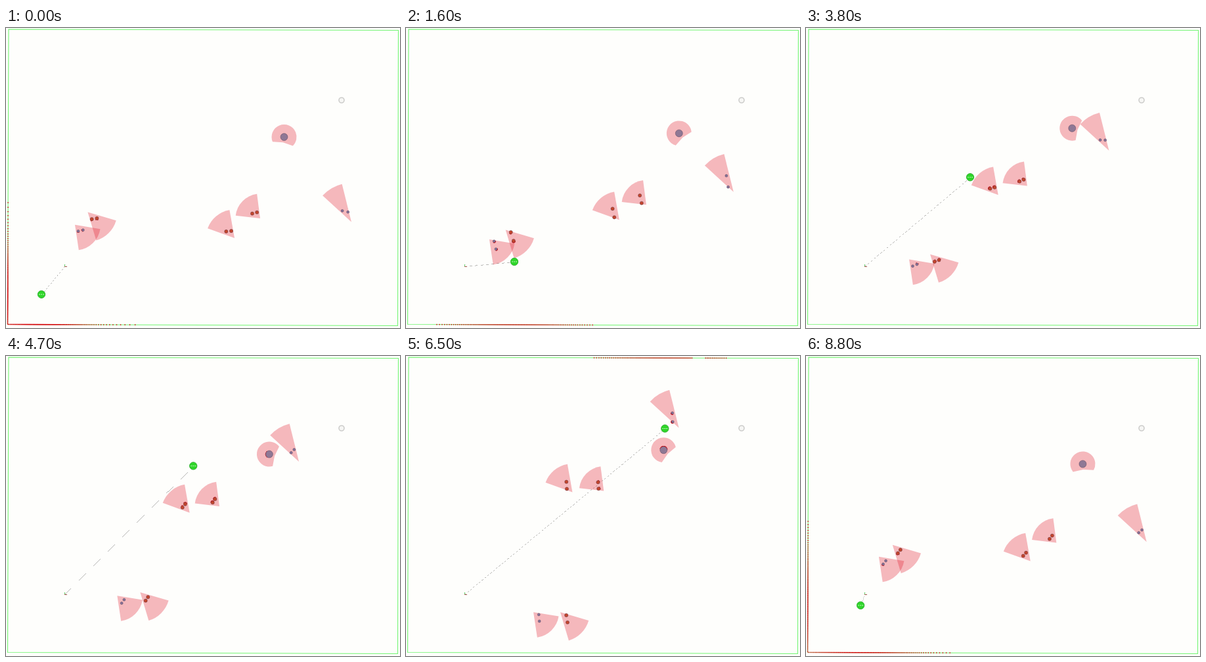
An HTML page with a canvas for the animation above (8900 ms loop, 600x457 px).

```html
<!DOCTYPE html>
<html lang="en">
<head>
<meta charset="utf-8">
<title>Robot among walkers</title>
<style>
html, body { margin: 0; width: 100%; height: 100%; overflow: hidden; background: #fefefc; }
canvas { display: block; width: 600px; height: 457px; }
</style>
</head>
<body>
<canvas id="stage" width="600" height="457"></canvas>
<script>
const ctx = document.getElementById('stage').getContext('2d');
const LOOP = 8900, RESTART = 8100, LEAD = 270;
const RAD = Math.PI / 180, TAU = Math.PI * 2;
const RANGE = 155, RAYS = 360;
const BLUE = '#86739a', RED = '#c4452c';

const walls = [[4, 2], [597.5, 3.5], [596.5, 453.5], [2.5, 451.5]];
const marker = { x: 89, y: 363 }, goal = { x: 511, y: 110 };

// robot waypoints: seconds, x, y
const route = [
  [0, 54, 405.8], [0.45, 84.5, 379.2], [1.6, 165, 356], [2.7, 212, 299],
  [3.8, 250, 227.3], [5.5, 322.3, 122.5], [6.5, 394.3, 110.5], [7.8, 491.3, 117.6]
];

// start, velocity per second, sector radius and spread in degrees
const walkers = [
  { x: 105, y: 299.8, vx: 13.7, vy: 13.9, r: 39, spread: 72, leg: 2, color: BLUE },
  { x: 124.5, y: 280.5, vx: 17, vy: 16.9, r: 45, spread: 57, leg: 2.6, color: RED },
  { x: 348, y: 320, vx: -14.55, vy: -17.3, r: 43.5, spread: 60, leg: 2.6, color: RED },
  { x: 387, y: 290, vx: -13.2, vy: -13, r: 37.5, spread: 76, leg: 2.6, color: RED },
  { x: 526, y: 295.5, vx: -17, vy: -28.6, r: 59.5, spread: 33.5, leg: 2, color: BLUE }
];

// cubic through the waypoints, straight beyond both ends
function along(axis, t) {
  const last = route.length - 1;
  const slope = (a, b) => (route[b][axis] - route[a][axis]) / (route[b][0] - route[a][0]);
  if (t <= 0) return route[0][axis] + slope(0, 1) * t;
  if (t >= route[last][0]) return route[last][axis] + slope(last - 1, last) * (t - route[last][0]);
  const i = route.findIndex(p => p[0] > t) - 1;
  const h = route[i + 1][0] - route[i][0], u = (t - route[i][0]) / h;
  const u2 = u * u, u3 = u2 * u, ease = 3 * u2 - 2 * u3;
  const tangent = k => slope(Math.max(k - 1, 0), Math.min(k + 1, last));
  return route[i][axis] * (1 - ease) + route[i + 1][axis] * ease
    + h * (tangent(i) * (u3 - 2 * u2 + u) + tangent(i + 1) * (u3 - u2));
}

function disc(x, y, r, fill, edge, width = 0.7) {
  ctx.beginPath();
  ctx.arc(x, y, r, 0, TAU);
  ctx.fillStyle = fill;
  ctx.fill();
  ctx.strokeStyle = edge;
  ctx.lineWidth = width;
  ctx.stroke();
}

function sector(apexX, apexY, x, y, r, from, to) {
  ctx.beginPath();
  ctx.moveTo(apexX, apexY);
  ctx.arc(x, y, r, from, to);
  ctx.closePath();
  ctx.fillStyle = 'rgba(220,20,40,0.3)';
  ctx.fill();
}

// draws the zone ahead of a walker and returns the two legs
function drawWalker(w, t) {
  const x = w.x + w.vx * t, y = w.y + w.vy * t;
  const head = Math.atan2(w.vy, w.vx), half = w.spread / 2 * RAD;
  sector(x, y, x, y, w.r, head - half, head + half);

  const c = Math.cos(head), s = Math.sin(head), reach = 0.315 * w.r;
  const swing = 0.135 * w.r * Math.cos((377 * t - 68) * RAD);
  const side = 3.2 * Math.sign(w.vx);
  return [-1, 1].map(k => {
    const ahead = reach + k * swing * Math.sign(w.vx);
    return {
      x: x + c * ahead + s * k * side, y: y + s * ahead - c * k * side,
      r: w.leg, color: w.color
    };
  });
}

// slow walker with a wide zone, open behind
function drawWideWalker(t) {
  const x = 423.5 - 4.8 * t, y = 166 - 3.5 * t;
  const back = (17 + 4.8 * (t - 4.2) ** 2) * RAD, half = 56 * RAD;
  sector(x + 8.5 * Math.cos(back), y + 8.5 * Math.sin(back), x, y, 19, back + half, back + TAU - half);
  return { x, y, r: 5.5, color: '#8f7895' };
}

function drawWalls() {
  ctx.beginPath();
  walls.forEach(p => ctx.lineTo(p[0], p[1]));
  ctx.closePath();
  ctx.strokeStyle = '#72f572';
  ctx.lineWidth = 1.1;
  ctx.stroke();
}

function wallHit(ox, oy, dx, dy) {
  const hits = walls.map((a, i) => {
    const b = walls[(i + 1) % 4], ex = b[0] - a[0], ey = b[1] - a[1];
    const d = ((a[0] - ox) * ey - (a[1] - oy) * ex) / (dx * ey - dy * ex);
    return d > 0 ? d : Infinity;
  });
  return Math.min(...hits);
}

function legHit(ox, oy, dx, dy, leg) {
  const px = leg.x - ox, py = leg.y - oy;
  const ahead = px * dx + py * dy, off = px * dy - py * dx;
  if (ahead < 0 || Math.abs(off) > leg.r) return Infinity;
  return ahead - Math.sqrt(leg.r * leg.r - off * off);
}

function drawScan(ox, oy, legs) {
  ctx.fillStyle = '#d80c14';
  for (let i = 0; i < RAYS; i++) {
    const a = i / RAYS * TAU, dx = Math.cos(a), dy = Math.sin(a);
    const d = Math.min(wallHit(ox, oy, dx, dy), ...legs.map(leg => legHit(ox, oy, dx, dy, leg)));
    if (d < RANGE) ctx.fillRect(ox + dx * d - 0.75, oy + dy * d - 0.75, 1.5, 1.5);
  }
}

// thin line whose dashes follow its slope against the pixel grid
function drawTether(x, y) {
  const dx = x - marker.x, dy = y - marker.y;
  const ax = Math.abs(dx), ay = Math.abs(dy), n = Math.max(ax, ay);
  const slope = Math.min(ax, ay) / n;
  const rate = Math.max(0.045, 1.33 * Math.min(slope, 1 - slope));
  ctx.fillStyle = '#b8b8b5';
  for (let k = 0; k < n; k++) {
    if ((k * rate + 0.55) % 1 < 0.5) continue;
    ctx.fillRect(Math.round(marker.x + dx * k / n), Math.round(marker.y + dy * k / n), 1, 1);
  }
}

function drawMarker() {
  const { x, y } = marker;
  ctx.fillStyle = '#62c862';
  ctx.fillRect(x, y - 3, 1, 3);
  ctx.fillStyle = '#a55a50';
  ctx.fillRect(x, y, 4, 1);
}

function drawRobot(x, y) {
  disc(x, y, 5.7, '#2fd62a', '#28a428', 0.8);
  ctx.fillStyle = '#c4f2bd';
  for (let k = -4; k < 5; k += 3) ctx.fillRect(x + k, y - 0.5, 2, 1);
}

function draw(t) {
  ctx.fillStyle = '#fefefc';
  ctx.fillRect(0, 0, 600, 457);
  drawWalls();
  disc(goal.x, goal.y, 4, '#f6f6f4', '#cdcdcb', 1.6);

  const x = along(1, t), y = along(2, t);
  drawTether(x, y);
  drawMarker();

  const legs = walkers.flatMap(w => drawWalker(w, t));
  legs.push(drawWideWalker(t));
  drawScan(x, y, legs);
  legs.forEach(leg => disc(leg.x, leg.y, leg.r, leg.color, 'rgba(75,55,75,0.6)'));
  drawRobot(x, y);
}

const start = performance.now();
function tick() {
  const ms = Math.floor((performance.now() - start) % LOOP / 100) * 100;
  draw((ms < RESTART ? ms : ms - RESTART - LEAD) / 1000);
  requestAnimationFrame(tick);
}
tick();
</script>
</body>
</html>
```
